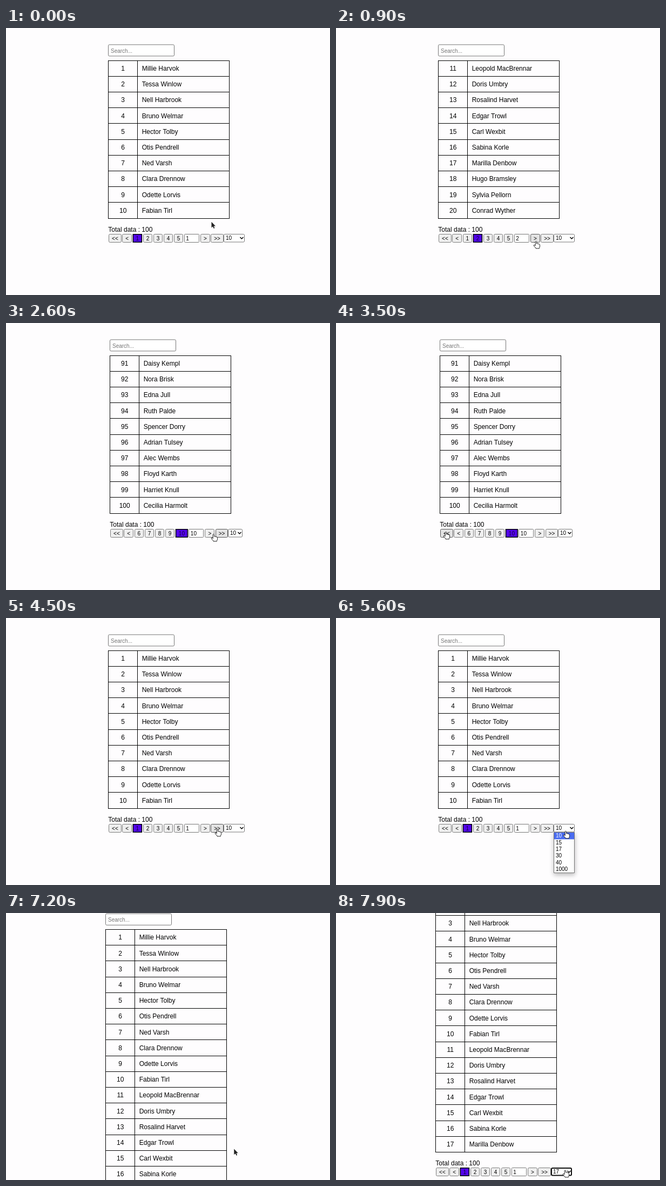
An HTML page with a canvas for the animation above (8 s loop, 600 px wide and 494 px high).

```html
<!DOCTYPE html>
<html lang="en">
<head>
<meta charset="utf-8">
<title>Paged table</title>
<style>
html, body { margin: 0; width: 600px; height: 494px; overflow: hidden; background: #fefdfe; }
canvas { display: block; }
</style>
</head>
<body>
<canvas id="stage" width="600" height="494"></canvas>
<script>
const ctx = document.getElementById('stage').getContext('2d');
const LOOP = 8000, STEP = 100, ROW = 29.2, TOP = 60;

const firstNames = `Millie Harvok,Tessa Winlow,Nell Harbrook,Bruno Welmar,Hector Tolby,Otis Pendrell,Ned Varsh,
Clara Drennow,Odette Lorvis,Fabian Tirl,Leopold MacBrennar,Doris Umbry,Rosalind Harvet,Edgar Trowl,Carl Wexbit,
Sabina Korle,Marilla Denbow,Hugo Bramsley,Sylvia Pellorn,Conrad Wyther,Martin Halvok,Rupert Dakle,Paula Gresk,
Ivy Macrennick,Desmond Corvane,Stanley Vower,Roland Addmoor,Beatrix Reln,Louisa Hebdarn,Douglas Otterbrook`.split(/,\s*/);
const lastNames = `Daisy Kempl,Nora Brisk,Edna Jull,Ruth Palde,Spencer Dorry,Adrian Tulsey,Alec Wembs,
Floyd Karth,Harriet Knull,Cecilia Harmolt`.split(/,\s*/);
const nameOf = id => id > 90 ? lastNames[id - 91] : firstNames[id - 1];

const options = [10, 15, 17, 30, 40, 1000];

// Pointer tip: time, x, y
const path = [
  [0, 380, 358], [200, 380, 359], [600, 370, 394], [1900, 370, 394], [2300, 389, 392],
  [2600, 384, 390], [2800, 384, 390], [3300, 203, 386], [3800, 203, 386], [4400, 391, 390],
  [4600, 391, 390], [5000, 425, 391], [5700, 425, 394], [6200, 422, 428], [6400, 422, 439],
  [6700, 421, 422], [7100, 421, 422], [7400, 424, 475], [8000, 424, 475]
];
const arrow = new Path2D('M.5 .8V11.5L3 9.2 4.8 13 6.4 12.3 4.8 8.4H8Z');
const hand = new Path2D('M-.8 8.3V1.4Q.4-.4 1.6 1.4V5Q2.9 4.2 3.9 5.3 5.2 4.7 6 6 7.5 5.8 7.5 7.6V9.8Q7.4 11.6 6.4 12.8V13.9H0V12.8L-3.4 9.6Q-4.6 7.6-3.2 7.4-2.1 7.4-.8 8.8Z');

const smooth = k => k * k * (3 - 2 * k);
const ramp = (t, a, b) => smooth(Math.min(1, Math.max(0, (t - a) / (b - a))));

function pointerAt(t) {
  const i = path.findIndex(p => p[0] > t), [a, x, y] = path[i - 1], [b, x2, y2] = path[i];
  const k = ramp(t, a, b);
  return { x: x + (x2 - x) * k, y: y + (y2 - y) * k };
}

function text(s, x, y, size = 10, color = '#000', align = 'left') {
  ctx.font = `${size}px "Liberation Sans", Arial, sans-serif`;
  ctx.textAlign = align;
  ctx.fillStyle = color;
  ctx.fillText(s, x, y);
}

function box(x, y, w, h, fill, stroke, radius = 2, line = 1) {
  ctx.beginPath();
  ctx.roundRect(x + line / 2, y + line / 2, w - line, h - line, radius);
  ctx.fillStyle = fill;
  ctx.fill();
  ctx.strokeStyle = stroke;
  ctx.lineWidth = line;
  ctx.stroke();
}

function table(x, scroll, first, count) {
  const lineY = i => Math.floor(TOP + ROW * i - scroll);
  ctx.fillStyle = '#000';
  for (let i = 0; i <= count; i++) ctx.fillRect(x, lineY(i), 225, 1);
  for (const dx of [0, 54, 224]) ctx.fillRect(x + dx, lineY(0), 1, lineY(count) - lineY(0));
  for (let i = 0; i < count; i++) {
    const y = 79 + ROW * i - scroll;
    text(first + i, x + 27.7, y, 12, '#000', 'center');
    text(nameOf(first + i), x + 62.7, y, 12);
  }
}

// Draws the pager row; returns whether the pointer is over a control
function pager(left, y, page, size, pointer, forced, focused) {
  let x = left + 1.05, over = false;
  const inRow = pointer.y >= y && pointer.y < y + 16;
  const inside = w => inRow && pointer.x >= x && pointer.x < x + w;

  function button(label, active) {
    const w = ctx.measureText(label).width + 12;
    const hit = inside(w);
    const hover = forced ? label === forced : hit;
    over ||= hit;
    const bx = Math.round(x), bw = Math.round(x + w) - bx;
    if (active) box(x, y, w, 16, '#5303ea', '#000', 0, 1.5);
    else box(bx, y, bw, 16, hover ? '#e3e3e3' : '#efefef', hover ? '#555' : '#7c7c7c');
    text(label, x + w / 2, y + 11.5, 10, active ? '#10063a' : '#000', 'center');
    x += w + 1.5;
  }

  ctx.font = '10px "Liberation Sans", Arial, sans-serif';
  button('<<');
  button('<');
  const start = page > 5 ? 6 : 1;
  for (let n = start; n < start + 5; n++) button(String(n), n === page);
  box(Math.round(x), y, 28, 16, '#fff', '#767676', 1);
  text(page, x + 3.4, y + 11.5);
  x += 30;
  button('>');
  button('>>');
  x = Math.floor(x - 1);
  const w = page === 10 ? 27 : 39;
  over ||= inside(w);
  box(x, y, w, 15.5, '#fff', focused ? '#101010' : '#767676', 2, focused ? 2 : 1);
  text(size, x + 3.9, y + 11.4);
  ctx.beginPath();
  ctx.moveTo(x + w - 8.5, y + 6);
  ctx.lineTo(x + w - 5.5, y + 9);
  ctx.lineTo(x + w - 2.5, y + 6);
  ctx.strokeStyle = '#000';
  ctx.lineWidth = 1.5;
  ctx.stroke();
  return over;
}

function dropdown(pointer) {
  const x = 403, y = 396, step = 12.4;
  const chosen = Math.max(0, Math.min(5, Math.floor((pointer.y - y - 1) / step)));
  ctx.save();
  ctx.shadowColor = 'rgba(0,0,0,.25)';
  ctx.shadowBlur = 8;
  ctx.shadowOffsetY = 3;
  box(x, y, 39, 76, '#fff', '#767676', 0);
  ctx.restore();
  options.forEach((value, i) => {
    if (i === chosen) {
      ctx.fillStyle = '#4a6cf0';
      ctx.fillRect(x + 1, y + 1 + step * i, 37, step);
    }
    text(value, x + 3.9, y + 10.2 + step * i, 10, i === chosen ? '#fff' : '#000');
  });
}

function drawPointer({ x, y }, pointing) {
  ctx.save();
  ctx.translate(x, y);
  ctx.lineJoin = 'round';
  if (pointing) {
    ctx.fillStyle = '#fff';
    ctx.strokeStyle = '#1c1c1c';
    ctx.lineWidth = 1;
    ctx.fill(hand);
    ctx.stroke(hand);
  } else {
    ctx.fillStyle = '#222';
    ctx.strokeStyle = '#fff';
    ctx.lineWidth = 1.2;
    ctx.stroke(arrow);
    ctx.fill(arrow);
  }
  ctx.restore();
}

function draw(t) {
  const page = t < 800 ? 1 : t < 1200 ? 2 : t < 2400 ? 3 : t < 3700 ? 10 : 1;
  const open = t >= 5100 && t < 7000, grown = t >= 7000;
  const size = grown ? 17 : 10;
  const left = grown ? 184 : page === 10 ? 192 : 189;
  const scroll = 114 * ramp(t, 7100, 7400);
  const bottom = ROW * (size - 10) - scroll;
  const pointer = pointerAt(t);

  ctx.fillStyle = '#fefdfe';
  ctx.fillRect(0, 0, 600, 494);
  box(left, 30.4 - scroll, 123, 22, '#fff', '#767676');
  text('Search...', left + 5, 45.6 - scroll, 10, '#757575');
  table(left, scroll, (page - 1) * 10 + 1, size);
  text('Total data : 100', left + .3, 377 + bottom, 12);
  const stale = t >= 2400 && t < 2800 ? '>>' : '';
  const over = pager(left, Math.round(381 + bottom), page, size, pointer, stale, grown);
  if (open) dropdown(pointer);
  drawPointer(pointer, over || (t >= 2400 && t < 4600));
}

const begin = performance.now();
function tick() {
  const t = (performance.now() - begin) % LOOP;
  draw(Math.floor(t / STEP) * STEP);
  requestAnimationFrame(tick);
}
tick();
</script>
</body>
</html>
```
